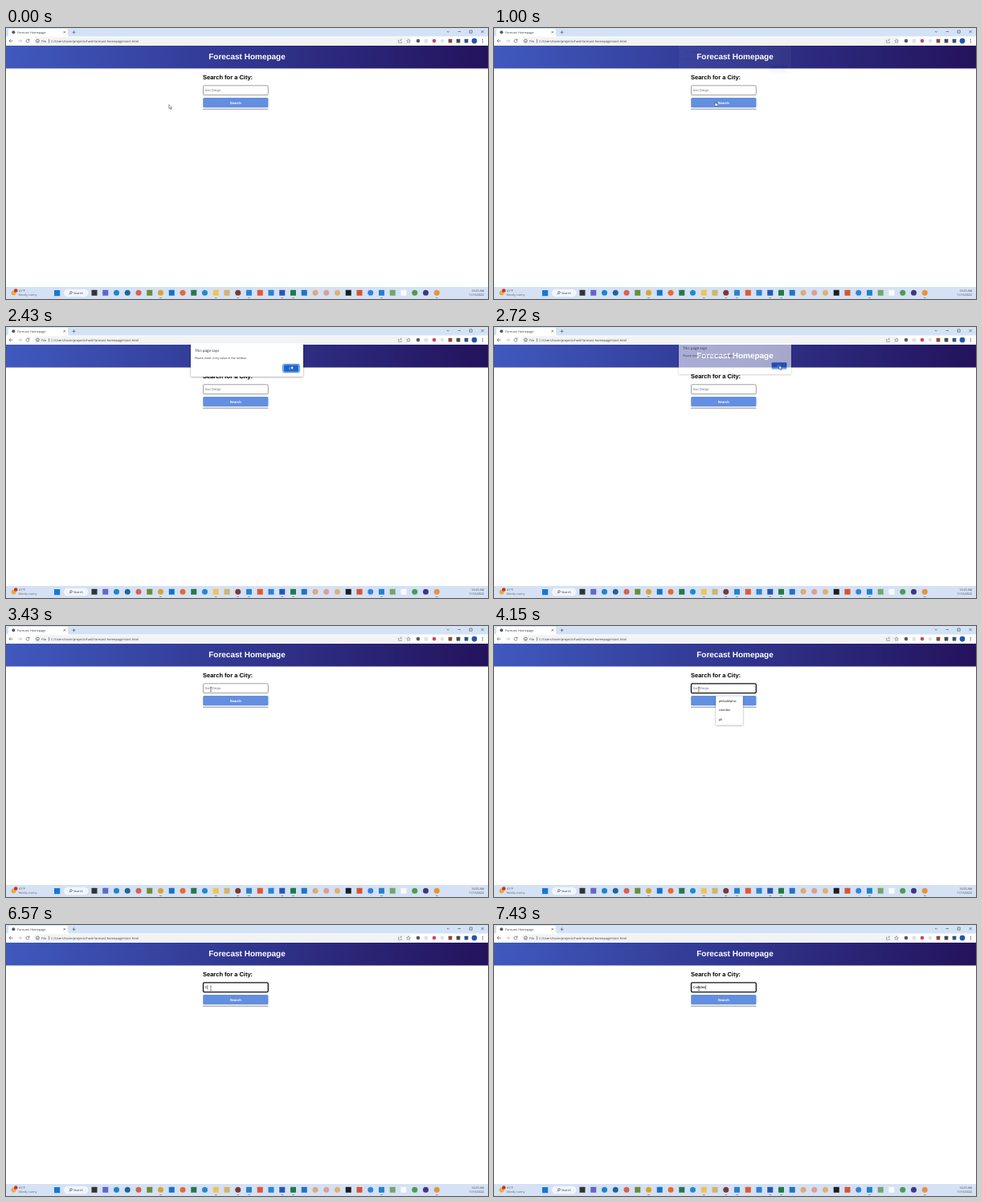
Animation of 600x338 px, one loop 8000 ms. Source, as an HTML page:

```html
<!DOCTYPE html>
<html lang="en">
<head>
<meta charset="utf-8">
<title>Forecast Homepage</title>
<style>
  html, body { margin: 0; height: 100%; overflow: hidden; background: #fff; }
  svg { display: block; width: 100%; height: 100%; }
  text { font-family: "Open Sans", sans-serif; font-size: 3.8px; fill: #3c4043; text-rendering: geometricPrecision; }
  .page text { font-family: "Liberation Sans", Arial, sans-serif; }
  .bold { font-weight: bold; }
  .mid { text-anchor: middle; }
  .end { text-anchor: end; }
  .line { fill: none; stroke: #444; stroke-width: .6; }
</style>
</head>
<body>
<svg viewBox="0 0 600 338" preserveAspectRatio="none">
  <defs>
    <linearGradient id="banner" gradientUnits="userSpaceOnUse" x1="0" y1="22" x2="600" y2="50">
      <stop offset="0" stop-color="#4059be"/>
      <stop offset=".5" stop-color="#30368f"/>
      <stop offset="1" stop-color="#24125c"/>
    </linearGradient>
    <filter id="shadow" x="-10%" y="-10%" width="120%" height="130%">
      <feDropShadow dx="0" dy=".6" stdDeviation=".8" flood-opacity=".45"/>
    </filter>
    <clipPath id="below"><rect y="20.5" width="600" height="300"/></clipPath>
  </defs>

  <g class="page">
    <rect y="22" width="600" height="28.5" fill="url(#banner)"/>
    <text class="bold mid" x="300" y="39.3" style="font-size:10px;fill:#fff">Forecast Homepage</text>
    <text class="bold" x="245" y="63.6" style="font-size:7.5px;fill:#000">Search for a City:</text>
    <rect id="field" x="245.5" y="71.8" width="80.8" height="11.8" rx="1.4" fill="#fff"/>
    <text id="entry" x="247.5" y="79.4" style="font-size:4.2px"></text>
    <path id="caret" stroke="#000" stroke-width=".5"/>
    <rect x="245.2" y="87" width="81.3" height="12.3" rx="1.5" fill="#638fe0"/>
    <text class="bold mid" x="285.8" y="94.8" style="font-size:4.3px;fill:#fff">Search</text>
    <path class="line" d="M245 101.2h81.5" stroke-width=".8"/>
    <g id="list" filter="url(#shadow)">
      <rect id="listBox" x="276.2" y="87.2" fill="#fff"/>
    </g>
  </g>

  <g id="browser">
    <rect width="600" height="12" fill="#d4e2f6"/>
    <path d="M1 10.5q2 0 2-2V3q0-2 2-2h70q2 0 2 2v5.500q0 2 2 2H600V22H0V10.500z" fill="#fff"/>
    <circle cx="9.300" cy="5.200" r="2" fill="#55595e"/>
    <text x="14" y="6.600">Forecast Homepage</text>
    <path class="line" d="M71.500 4l2.500 2.500m0-2.500l-2.500 2.500M82.500 5.300h4m-2-2v4
      M548.800 3.800l1.500 1.500 1.500-1.500M562.500 4.500h3.500M577 3h3.200v3.200h-3.200zM591.500 3l3.200 3.200m0-3.200l-3.200 3.200"/>
    <rect x="34" y="11.600" width="471" height="9" rx="4.500" fill="#f1f3f4"/>
    <path class="line" d="M8.500 16.100H4m2-2l-2 2 2 2M28.700 15a2 2 0 1 0 .3 1.500M29 13.600v1.600h-1.600M39.400 15.900v1.600m0-2.700v.4M53.600 14v4.500"/>
    <path class="line" d="M15 16.100h4.500m-2-2l2 2-2 2" style="stroke:#aaa"/>
    <circle class="line" cx="39.400" cy="16.100" r="2"/>
    <text x="44" y="17.600">File</text>
    <text x="56" y="17.600" style="font-size:4px">C:/Users/tovin/projects/hw4-forecast-homepage/start.html</text>
    <path class="line" d="M489 15h-.6v3.300h4V17M489.500 16.500q.4-1.700 2.800-1.700m-1-1l1.200 1-1.200 1
      M501 13.800l.7 1.500 1.600.2-1.200 1.100.3 1.700-1.400-.9-1.400.9.3-1.700-1.200-1.100 1.600-.2z" style="stroke:#666;stroke-width:.5"/>
    <path d="M592.800 14h1v1h-1zm0 1.700h1v1h-1zm0 1.700h1v1h-1z" fill="#444"/>
  </g>

  <g id="taskbar">
    <rect y="323" width="600" height="15" fill="#d5e1f4"/>
    <circle cx="9.500" cy="330.500" r="3" fill="#f2a93b"/>
    <circle cx="12.200" cy="327.500" r="2.300" fill="#c8321f"/>
    <text x="16" y="329.300" style="font-size:3.700px">41°F</text>
    <text x="15.500" y="334.400" style="font-size:3.700px;fill:#666">Mostly sunny</text>
    <rect x="60" y="327" width="7.200" height="7.200" fill="#1478d4"/>
    <rect x="72" y="325.800" width="30.500" height="9.500" rx="4.700" fill="#f2f6fc"/>
    <circle class="line" cx="81" cy="330" r="1.400"/>
    <path class="line" d="M80 331l-1.400 1.400"/>
    <text x="84" y="332">Search</text>
    <text class="end" x="595" y="329.300" style="font-size:3.600px">10:25 AM</text>
    <text class="end" x="595" y="334.400" style="font-size:3.600px">11/16/2022</text>
  </g>

  <g clip-path="url(#below)">
    <g id="dialog">
      <rect x="230" y="18" width="140" height="43.800" rx="1.500" fill="#fff" filter="url(#shadow)"/>
      <text x="235" y="31.300" style="font-size:4.500px;fill:#222">This page says</text>
      <text x="235" y="40" style="font-size:3.600px;fill:#333">Please enter a city value in the textbox.</text>
      <rect id="ring" x="344.600" y="46.400" width="20.800" height="10.200" rx="1.600" fill="#fff" stroke="#1a6fdc" stroke-width=".8"/>
      <rect x="345.600" y="47.300" width="18.800" height="8.400" rx="1" fill="#1766d0"/>
      <text class="mid" x="355" y="52.800" style="fill:#fff">OK</text>
    </g>
  </g>

  <g id="pointer">
    <path id="arrow" d="M0 0v5l1.200-1.100.9 2 .9-.4-.9-1.900h1.700z" fill="#fff" stroke="#222" stroke-width=".45"/>
    <path id="hand" d="M0 .4q.5-.8 1 0v1.900l2 .6q.5.300.4 1l-.5 2H.6l-1.600-2.300q.2-.6 1 0z" fill="#fff" stroke="#222" stroke-width=".45"/>
    <path id="beam" class="line" d="M-1.200-2.800q1.200 0 1.200.6 0-.6 1.200-.6M0-2.500v5M-1.200 2.800q1.200 0 1.200-.6 0 .6 1.200.6" style="stroke:#222;stroke-width:.5"/>
  </g>
</svg>
<script>
const $ = id => document.getElementById(id);
const set = (el, attrs) => { for (const k in attrs) el.setAttribute(k, attrs[k]); return el; };
const add = (parent, tag, attrs) =>
  parent.appendChild(set(document.createElementNS('http://www.w3.org/2000/svg', tag), attrs));
const show = (el, on) => { el.style.display = on ? '' : 'none'; };

// "o" marks a round icon, "s" a square one
function icon(parent, spec, x, y, r) {
  const fill = '#' + spec.slice(1);
  if (spec[0] === 'o') add(parent, 'circle', { cx: x, cy: y, r, fill });
  else add(parent, 'rect', { x: x - r, y: y - r, width: 2 * r, height: 2 * r, rx: .5, fill });
}

const apps = ('s333 s6266c8 o1b86c9 o1c6794 od8604f s6d8c35 od9a52e s1673c5 oe8692c s28764f o2388d0 ' +
  'sf2c34c sd0b667 o7d3930 s2583cc se4572e s2a83d0 s2459b0 s1e7b48 s2272c4 odfaa76 odd9e96 oe0b26c ' +
  's1c1e22 sd9532c o3282e0 s2382cc s72a767 sfafafa o4a9c50 o41367e oe8923c').split(' ');
apps.forEach((spec, i) => icon($('taskbar'), spec, 110 + 13.75 * i, 330.3, 3.5));
[6, 11, 13, 14, 17, 18, 26, 31].forEach(i =>
  add($('taskbar'), 'rect', { x: 108.5 + 13.75 * i, y: 336, width: 3, height: .8, rx: .4, fill: '#777f8c' }));
'o535a66 sdfe2e8 od34350 oe1dfe6 s8a4a30 s45484d s31517e o2356a8'.split(' ').forEach((spec, i) =>
  icon($('browser'), spec, 513 + 10 * i, 16.1, i === 7 ? 3.4 : 2.3));

const suggestions = ['philadelphia', 'camden', 'ph'];
const rows = suggestions.map(() => add($('list'), 'text', { x: 279.8, style: 'font-size:4.1px;fill:#333' }));

// step, x, y
const path = [[0, 202.8, 95.6], [6, 275.3, 91.6], [9, 275.3, 91.6], [12, 309.2, 72], [17, 355, 48],
  [19, 355, 48], [21, 300, 92], [22, 300, 92], [23, 240, 79], [24, 255, 79]];
// step, text in the field
const typing = [[0, ''], [39, 'c'], [45, ''], [46, 'C'], [49, 'Ca'], [50, 'Cam'], [51, 'Camd'], [52, 'Camden']];
// step, number of suggestions shown
const listing = [[0, 0], [25, 3], [40, 1], [45, 0], [47, 1], [52, 0]];
// step, opacity, vertical shift
const fading = [[0, 0, 0], [7, .04, 0], [8, 1, 0], [18, .88, -1], [19, .58, -3], [20, .15, -4], [21, 0, -4]];

const at = (keys, step) => keys.filter(k => k[0] <= step).pop();

function pointerAt(step) {
  const a = at(path, step), b = path.find(k => k[0] > step) || a;
  const f = a === b ? 0 : (step - a[0]) / (b[0] - a[0]);
  return [a[1] + (b[1] - a[1]) * f, a[2] + (b[2] - a[2]) * f];
}

function drawField(step) {
  const focused = step >= 25, value = at(typing, step)[1], entry = $('entry');
  set($('field'), { stroke: focused ? '#111' : '#777', 'stroke-width': focused ? 1.3 : .7 });
  entry.textContent = value;
  const x = 247.8 + (value ? entry.getComputedTextLength() : 0);
  if (!value) entry.textContent = 'San Diego';
  entry.style.fill = value ? '#000' : '#757575';
  set($('caret'), { d: `M${x} 75.3v5` });
  show($('caret'), focused && (step >= 39 || Math.floor((step - 25) / 4) % 2 === 0));
}

function drawList(step) {
  const count = at(listing, step)[1], items = count === 1 ? ['camden'] : suggestions.slice(0, count);
  show($('list'), count);
  set($('listBox'), { width: count === 1 ? 27.5 : 33.6, height: 2.2 + 11.3 * count });
  rows.forEach((row, i) => {
    row.textContent = items[i] || '';
    set(row, { y: 94.9 + 11.3 * i });
  });
}

function draw(step) {
  const [, opacity, shift] = at(fading, step);
  set($('dialog'), { opacity, transform: `translate(0 ${shift})` });
  show($('ring'), step < 18);
  drawField(step);
  drawList(step);
  const [x, y] = pointerAt(step);
  const onButton = x > 245 && x < 326 && y > 87 && y < 99 && opacity < .1;
  const kind = step >= 24 ? 'beam' : onButton ? 'hand' : 'arrow';
  set($('pointer'), { transform: `translate(${x} ${y})` });
  for (const name of ['arrow', 'hand', 'beam']) show($(name), name === kind);
}

function tick() {
  draw(Math.floor((performance.now() % 8000 + 5) * 7 / 1000));
  requestAnimationFrame(tick);
}
tick();
</script>
</body>
</html>
```
